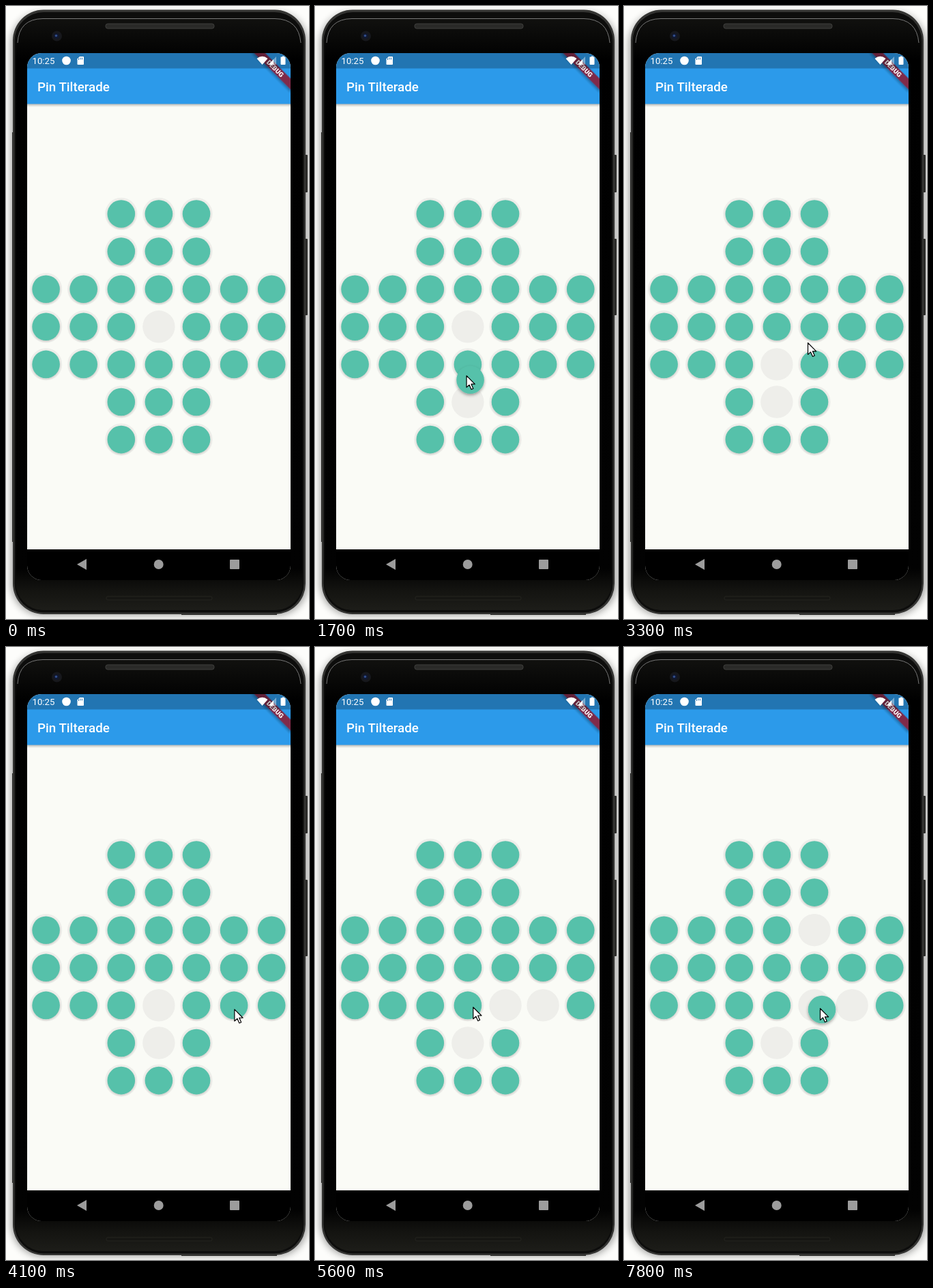
An HTML page for the animation above (8 s loop, 444 px wide and 898 px high).

```html
<!DOCTYPE html>
<html lang="en">
<head>
<meta charset="utf-8">
<title>Pin Tilterade</title>
<style>
  html, body { margin: 0; width: 100%; height: 100%; overflow: hidden; background: #fdfdfb; }
  svg { display: block; width: 444px; height: 898px; }
  text { font-family: Roboto, sans-serif; fill: #fff; }
</style>
</head>
<body>
<svg viewBox="0 0 444 898" xmlns="http://www.w3.org/2000/svg">
  <defs>
    <linearGradient id="body" x1="0" y1="0" x2="0" y2="1">
      <stop offset="0" stop-color="#11110f"/>
      <stop offset=".07" stop-color="#000"/>
      <stop offset=".93" stop-color="#020202"/>
      <stop offset=".965" stop-color="#131310"/>
      <stop offset="1" stop-color="#1d1d19"/>
    </linearGradient>
    <linearGradient id="fade" x1="0" y1="0" x2="0" y2="1">
      <stop offset="0" stop-color="#000" stop-opacity=".28"/>
      <stop offset="1" stop-color="#000" stop-opacity="0"/>
    </linearGradient>
    <clipPath id="screen"><rect x="31" y="69" width="386" height="772" rx="21"/></clipPath>
    <filter id="soft" x="-10%" y="-10%" width="120%" height="120%"><feGaussianBlur stdDeviation="6"/></filter>
    <filter id="low" x="-20%" y="-20%" width="140%" height="150%">
      <feDropShadow dx="0" dy="1" stdDeviation="1" flood-opacity=".2"/>
    </filter>
    <filter id="high" x="-30%" y="-30%" width="160%" height="170%">
      <feDropShadow dx="0" dy="2.2" stdDeviation="2" flood-opacity=".36"/>
    </filter>
  </defs>

  <rect width="444" height="898" fill="#fdfdfb"/>
  <rect x="8" y="10" width="434" height="882" rx="46" opacity=".4" filter="url(#soft)"/>

  <g id="phone">
    <g fill="#2b2b29">
      <rect x="9" y="185" width="3" height="600"/>
      <rect x="437" y="218" width="5" height="55" rx="1"/>
      <rect x="437" y="341" width="5" height="112" rx="1"/>
      <rect x="257" y="888" width="140" height="4"/>
    </g>
    <rect x="10" y="5.500" width="429" height="885.500" rx="45" fill="#343432"/>
    <rect x="12.500" y="9" width="424" height="879.500" rx="43" fill="#0d0d0c"/>
    <rect x="14.500" y="18" width="420" height="867" rx="40" fill="url(#body)"/>
    <path d="M17 54Q19 19 54 18.500H394Q429 19 432 54" fill="none" stroke="#777"/>
    <rect x="146" y="26" width="159" height="7" rx="3" fill="#2a2a28" stroke="#3e3e3c"/>
    <rect x="147" y="865" width="155" height="5" rx="2" fill="#161613" stroke="#24241f"/>
    <circle cx="74.500" cy="44" r="7.500" fill="#17181c"/>
    <circle cx="74" cy="44" r="4" fill="#11182e"/>
    <circle cx="73.500" cy="43.500" r="1.800" fill="#314d8b"/>
  </g>

  <g clip-path="url(#screen)">
    <rect x="31" y="69" width="386" height="772" fill="#fafbf6"/>
    <rect x="31" y="143" width="386" height="5" fill="url(#fade)"/>
    <rect x="31" y="69" width="386" height="74.500" fill="#2c9aea"/>
    <text x="46" y="124.500" font-size="18.8" font-weight="500">Pin Tilterade</text>

    <g transform="translate(417 69) rotate(45)">
      <rect x="-40" y="26.300" width="80" height="11.300" fill="#802a4a" filter="url(#high)"/>
      <text y="35.400" font-size="9.6" font-weight="900" text-anchor="middle">DEBUG</text>
    </g>

    <rect x="31" y="69" width="386" height="22.500" opacity=".24"/>
    <text x="38.500" y="85" font-size="13.2">10:25</text>
    <g fill="#fff">
      <circle cx="88.500" cy="80" r="6.300"/>
      <path d="M108 74h5q1 0 1 1v10q0 1-1 1h-7.500q-1 0-1-1v-7.500z"/>
      <path d="M367.500 77Q375.500 70.500 383.500 77L375.500 86z"/>
      <path d="M396 74V86H385z" opacity=".4"/>
      <path d="M392 78V86H385z"/>
      <path d="M404 74.500h1v-1h2.500v1h1q1 0 1 1v9.500q0 1-1 1h-5q-1 0-1-1v-9.500q0-1 1-1z"/>
    </g>
    <path d="M106.500 76.500v2.500M109 75.500v3M111.500 75.500v3" stroke="#2575b1"/>

    <g id="holes" fill="#eeeeea"></g>
    <g id="pegs" fill="#57c1aa"></g>
    <circle id="drag" r="20.300" fill="#57c1aa" filter="url(#high)"/>

    <rect x="31" y="796" width="386" height="45"/>
    <g fill="#9c9c9c">
      <path d="M104 818L118 810V826z"/>
      <circle cx="223.700" cy="818" r="7"/>
      <rect x="328" y="811" width="14" height="14" rx="1"/>
    </g>
  </g>

  <path id="cursor" d="M.5 .5V17.500L4.500 13.900L7.500 20.500L10.300 19.300L7.400 12.800H12.700Z" fill="#fff" stroke="#000" stroke-width="1.200" stroke-linejoin="round"/>
</svg>

<script>
const LOOP = 8000, STEP = 100, APPEAR = 500;
const NS = 'http://www.w3.org/2000/svg';
const $ = id => document.getElementById(id);
const place = (c, r) => [58.6 + c * 55.1, 304.5 + r * 55.1];
const ease = k => k * k * (3 - 2 * k);

// Pointer glides: start time, end time, goal
const entry = [284, 595];
const glides = [
  [400, 800, 222, 579],
  [900, 1000, 220, 575],
  [1400, 2200, 225, 468],
  [2200, 2400, 222, 468],
  [3200, 3300, 269, 493],
  [3300, 3700, 324, 546],
  [3700, 4300, 338, 525],
  [4400, 4800, 235, 525],
  [5400, 5700, 230, 528],
  [6200, 6700, 274, 415],
  [6900, 7400, 289, 529],
  [7700, 7800, 287, 529]
];

// A held peg keeps its offset from the pointer
const moves = [
  { from: [3, 5], over: [3, 4], to: [3, 3], grab: 1500, drop: 2700, offset: [6, 6.5] },
  { from: [5, 4], over: [4, 4], to: [3, 4], grab: 4500, drop: 5500, offset: [-18, 0] },
  { from: [4, 2], over: [4, 3], to: [4, 4], grab: 7000, drop: LOOP, offset: [3, 2] }
];

function pointer(t) {
  let [x, y] = entry;
  for (const [start, end, gx, gy] of glides) {
    if (t <= start) break;
    const k = ease(Math.min(1, (t - start) / (end - start)));
    x += (gx - x) * k;
    y += (gy - y) * k;
  }
  return [x, y];
}

function disc(parent, [x, y], r) {
  const el = document.createElementNS(NS, 'circle');
  el.setAttribute('cx', x);
  el.setAttribute('cy', y);
  el.setAttribute('r', r);
  return parent.appendChild(el);
}

const pegs = {};
const inner = n => n > 1 && n < 5;
for (let r = 0; r < 7; r++) for (let c = 0; c < 7; c++) {
  if (!inner(r) && !inner(c)) continue;
  disc($('holes'), place(c, r), 23.7);
  pegs[[c, r]] = disc($('pegs'), place(c, r), 20.3);
  pegs[[c, r]].setAttribute('filter', 'url(#low)');
}

const show = (el, on) => el.setAttribute('visibility', on ? 'visible' : 'hidden');
const shift = (el, x, y) => el.setAttribute('transform', `translate(${x} ${y})`);

function draw(ms) {
  const t = Math.floor((ms % LOOP) / STEP) * STEP;
  const empty = new Set(['3,3']);
  let held = null;
  for (const m of moves) {
    if (t < m.grab) break;
    empty.add(String(m.from));
    if (t < m.drop) held = m;
    else {
      empty.add(String(m.over));
      empty.delete(String(m.to));
    }
  }
  for (const key in pegs) show(pegs[key], !empty.has(key));

  const [x, y] = pointer(t);
  show($('cursor'), t >= APPEAR);
  shift($('cursor'), x, y);
  show($('drag'), held);
  if (held) shift($('drag'), x + held.offset[0], y + held.offset[1]);
}

const start = performance.now();
function tick() {
  draw(performance.now() - start);
  requestAnimationFrame(tick);
}
tick();
</script>
</body>
</html>
```
